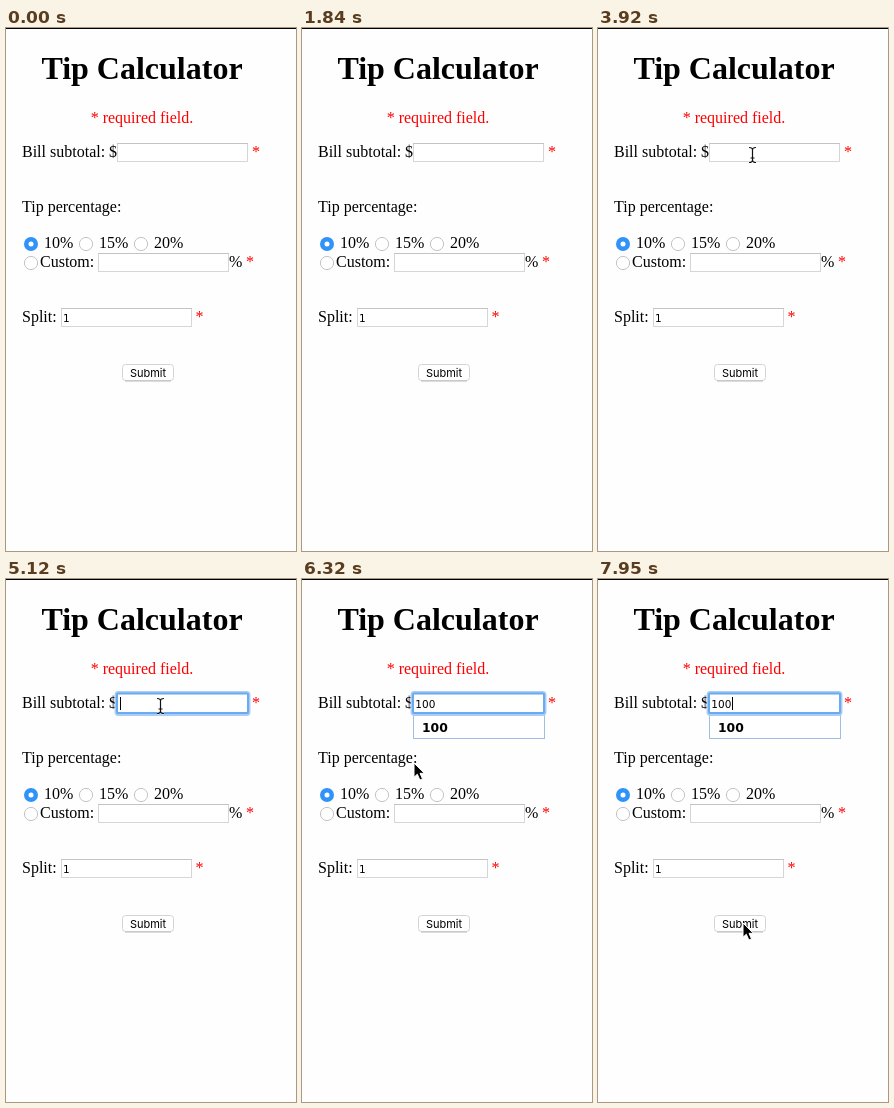
These frames come from a looping animation (290 by 523 pixels, 8 s). An HTML page:

```html
<!DOCTYPE html>
<html lang="en">
<head>
<meta charset="utf-8">
<title>Tip Calculator</title>
<style>
html, body { margin: 0; width: 100%; height: 100%; overflow: hidden; background: #fefefe; }
svg { display: block; width: 290px; height: 523px; }
text { font: 16px "Liberation Serif", "Times New Roman", serif; white-space: pre; }
.title { font-size: 32px; font-weight: bold; }
.red { fill: #f00; }
.input { font: 10.5px "DejaVu Sans", sans-serif; }
.option { font: bold 12.4px "DejaVu Sans", sans-serif; }
.button { font: 11px Inter, sans-serif; }
</style>
</head>
<body>
<svg id="stage" viewBox="0 0 290 523"></svg>
<script>
const LOOP = 8000;
const stage = document.getElementById("stage");

const label = (x, y, s, cls = "", extra = "") =>
  `<text x="${x}" y="${y}" class="${cls}" ${extra}>${s}</text>`;
const box = (x, y, w, h, fill, stroke, extra = "") =>
  `<rect x="${x}" y="${y}" width="${w}" height="${h}" fill="${fill}" stroke="${stroke}" ${extra}/>`;
const field = (x, y) =>
  box(x + .5, y + .5, 130, 18, "#fff", "#d6d6d6") +
  `<path d="M${x} ${y + .5}h131" stroke="#c4c4c4"/>`;
const radio = (x, y) =>
  `<circle cx="${x}" cy="${y}" r="6.6" fill="#fff" stroke="#bdbdbd" stroke-width=".9"/>`;
const spinner = (id, x, y) =>
  `<g id="${id}" transform="translate(${x} ${y})">` +
  box(.5, .5, 8, 14, "#fbfbfb", "#d2d2d2", 'rx="3.5"') +
  `<path d="M2.7 5.8L4.5 3.8L6.3 5.8M2.7 9.4L4.5 11.4L6.3 9.4" fill="none" stroke="#444" stroke-width="1.1"/></g>`;

stage.innerHTML =
  `<rect width="290" height="523" fill="#fefefe"/><rect width="290" height="1"/>` +
  label(136, 51, "Tip Calculator", "title", 'text-anchor="middle"') +
  label(136, 95, "* required field.", "red", 'text-anchor="middle"') +
  label(16, 129, "Bill subtotal: $") + field(111, 115) + label(246, 129, "*", "red") +
  label(16, 184, "Tip percentage:") +
  radio(80, 216) + radio(135, 216) + radio(25, 235) +
  `<circle cx="25" cy="216" r="7" fill="#2f93f8"/><circle cx="25" cy="216" r="2.5" fill="#fff"/>` +
  label(38, 220, "10%") + label(93, 220, "15%") + label(148, 220, "20%") +
  label(34, 239, "Custom:") + field(92, 225) + label(223, 239, "%") + label(240, 239, "*", "red") +
  label(16, 294, "Split:") + field(55, 280) + label(57, 294, "1", "input") + label(189.5, 294, "*", "red") +
  spinner("tipSpin", 209, 227) + spinner("splitSpin", 172, 282) +
  box(116.5, 336.5, 51, 16, "#fff", "#d4d4d4", 'rx="3"') +
  `<path d="M119 353h46" stroke="#bcbcbc"/>` +
  label(142, 349, "Submit", "button", 'text-anchor="middle"') +
  `<g id="list">` + box(111.5, 134.5, 131, 25, "#fff", "#9dbfe2", 'id="panel"') + `<g id="options"></g></g>` +
  `<g id="focus" fill="none">` +
  box(110.5, 114, 132, 21, "none", "#a9cdf6", 'rx="2" stroke-width="4"') +
  box(111, 114.5, 131, 19.5, "#fff", "#6aaaf0", 'rx="1" stroke-width="2"') + `</g>` +
  label(113.3, 129, "", "input", 'id="bill"') +
  `<rect id="caret" y="118" width="1" height="13"/>` +
  `<path id="arrow" d="M0 0V14.3L3.3 11.2L5.9 17L8.5 15.9L6 10.3H10.4Z" stroke="#fff" stroke-width="1"/>` +
  `<g id="beam" fill="none"><path d="M-3.5 -7.5Q0 -7.5 0 -5V5Q0 7.5 -3.5 7.5M3.5 -7.5Q0 -7.5 0 -5V5Q0 7.5 3.5 7.5M-2 3H2" stroke="#fff" stroke-width="2.4" opacity=".6"/>` +
  `<path d="M-3.5 -7.5Q0 -7.5 0 -5V5Q0 7.5 -3.5 7.5M3.5 -7.5Q0 -7.5 0 -5V5Q0 7.5 3.5 7.5M-2 3H2" stroke="#111" stroke-width="1.2"/></g>`;

const el = id => document.getElementById(id);
const show = (id, on) => el(id).setAttribute("display", on ? "inline" : "none");

// Pointer stops: time, shape (A arrow, I beam, "" hidden), hotspot
const pointer = [
  [0, ""],
  [500, "A", 209, 219], [650, "A", 190, 192], [800, "A", 166, 162], [950, "A", 151, 141],
  [1100, "A", 146, 131], [1240, "A", 144, 132], [1390, "I", 155, 130], [1540, "I", 177, 129],
  [1690, "A", 270, 142], [1840, ""],
  [3180, "I", 197, 132], [3330, "I", 179, 132], [3620, "I", 170, 131], [3770, "I", 159, 128],
  [3920, "I", 154.5, 127],
  [6020, "I", 149, 131], [6170, "A", 130, 158], [6320, "A", 112, 184], [6470, "A", 108, 204],
  [6620, "A", 115, 220], [6770, "I", 126, 236], [6920, "I", 134, 240], [7070, "I", 138.5, 240],
  [7220, "A", 112, 266], [7360, "I", 94, 293],
  [7660, "A", 122, 323], [7810, "A", 140, 340], [7950, "A", 145, 344]
];
const typed = [[0, ""], [5420, "1"], [5570, "10"], [5720, "100"]];
const caret = [[0, 0], [4220, 1], [4670, 0], [5120, 1], [6170, 0], [6620, 1], [7070, 0], [7360, 1]];
const history = ["100", "10", "1", "15", "12"];

const at = (track, t) => track.findLast(k => k[0] <= t);
const inside = (x, y, left, top) => x >= left && x <= left + 131 && y >= top && y <= top + 19;

function draw(t) {
  const [, shape, x = 0, y = 0] = at(pointer, t);
  for (const [id, kind] of [["arrow", "A"], ["beam", "I"]]) {
    show(id, shape === kind);
    el(id).setAttribute("transform", `translate(${x} ${y})`);
  }
  show("tipSpin", inside(x, y, 92, 225));
  show("splitSpin", inside(x, y, 55, 280));

  const text = at(typed, t)[1];
  const matches = text ? history.filter(s => s.startsWith(text)) : [];
  el("bill").textContent = text;
  show("focus", t >= 4220);
  show("list", matches.length > 0);
  el("panel").setAttribute("height", 1 + 24 * matches.length);
  el("options").innerHTML = matches.map((s, i) => label(120, 153 + 24 * i, s, "option")).join("");
  show("caret", at(caret, t)[1]);
  el("caret").setAttribute("x", Math.round(113.7 + 6.65 * text.length));
}

function frame() {
  draw(performance.now() % LOOP);
  requestAnimationFrame(frame);
}
frame();
</script>
</body>
</html>
```
